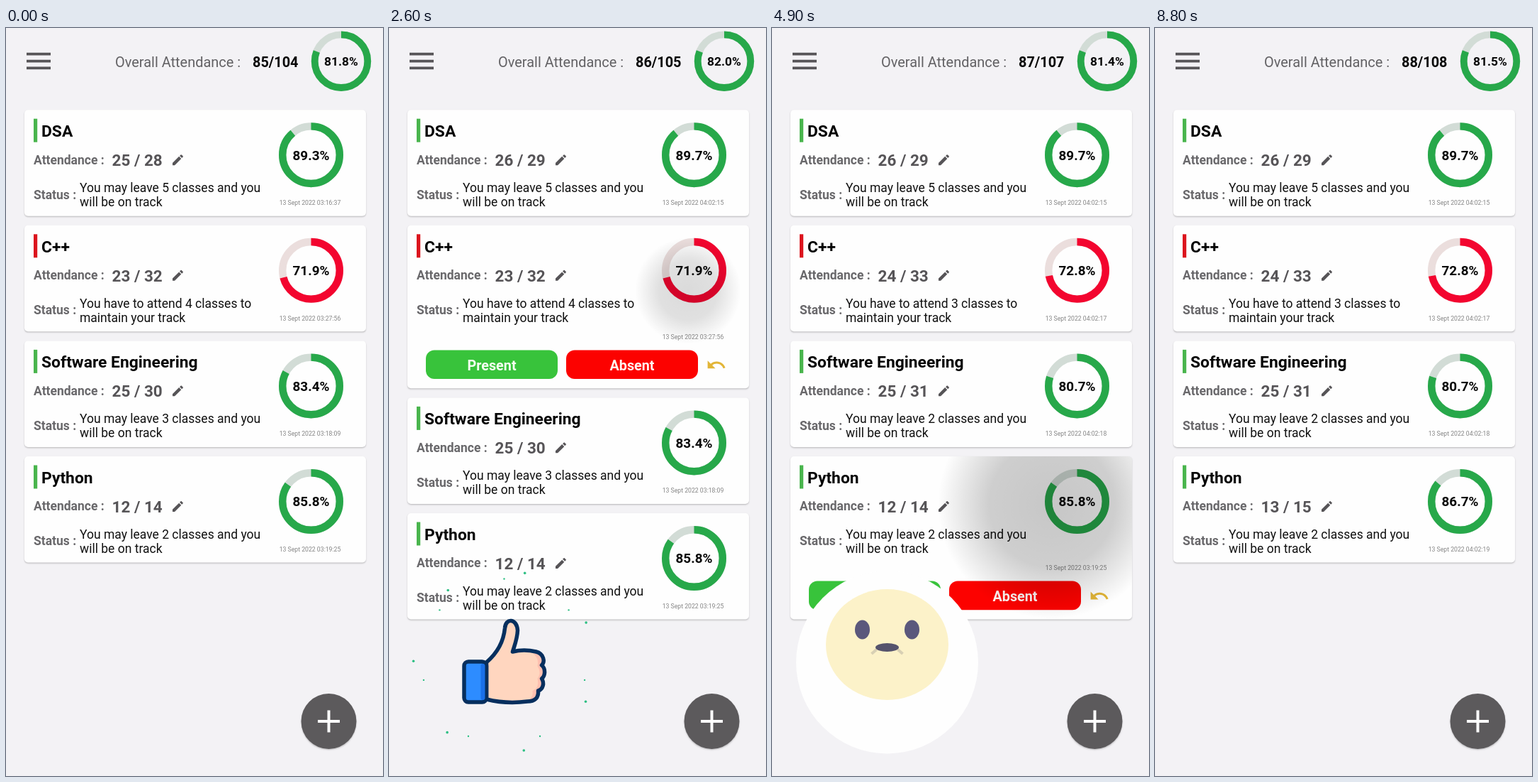
Recreate the animation shown at these times as an HTML page with a canvas. Size 532 by 1053 pixels, loop 8900 ms.

```html
<!DOCTYPE html>
<html lang="en">
<head>
<meta charset="utf-8">
<title>Attendance tracker</title>
<style>
html, body { margin: 0; width: 100%; height: 100%; overflow: hidden; background: #f3f2f5; }
canvas { display: block; }
</style>
</head>
<body>
<canvas id="stage" width="532" height="1053"></canvas>
<script>
const ctx = document.getElementById('stage').getContext('2d');
const LOOP = 8900, STEP = 100, TAU = Math.PI * 2, GOAL = 0.75;
const GREEN = '#27a84a', RED = '#f3052f', GREY = '#69686b', DARK = '#565457', NAVY = '#062f5e';

// opened: the card is tapped; marked: its button takes effect
const courses = [
  { name: 'DSA', attended: 25, total: 28, before: '03:16:37', after: '04:02:15', opened: 1100, marked: 1900, present: true, tap: [430, 70] },
  { name: 'C++', attended: 23, total: 32, before: '03:27:56', after: '04:02:17', opened: 2500, marked: 3300, present: true, tap: [422, 92] },
  { name: 'Software Engineering', attended: 25, total: 30, before: '03:18:09', after: '04:02:18', opened: 3400, marked: 4400, present: false, tap: [430, 80] },
  { name: 'Python', attended: 12, total: 14, before: '03:19:25', after: '04:02:19', opened: 4720, marked: 5900, present: true, tap: [395, 68] }
];

const pencil = new Path2D('M3 17.25V21h3.75L17.81 9.94l-3.75-3.75L3 17.25zM20.71 7.04a.996.996 0 0 0 0-1.41l-2.34-2.34a.996.996 0 0 0-1.41 0l-1.83 1.83 3.75 3.75 1.83-1.83z');
const undo = new Path2D('M12.5 8c-2.65 0-5.05.99-6.9 2.6L2 7v9h9l-3.62-3.62c1.39-1.16 3.16-1.88 5.12-1.88 3.54 0 6.55 2.31 7.6 5.5l2.37-.78C21.08 11.03 17.15 8 12.5 8z');
const hand = new Path2D('M-25 1C-11 -11 -1 -27 1 -47C2 -62 18 -61 19 -44C18.5 -32 15 -24 12 -14Q28 -18 45 -14C56 -11 58 0 53 5C59 10 58 20 53 24C57 30 55 39 48 41C49 51 43 56 33 56Q3 60 -25 53Z');
const knuckles = new Path2D('M38 -14C56 -12 58 0 53 5C59 10 58 20 53 24C57 30 55 39 48 41C49 51 43 56 32 56Q42 50 40 41Q50 37 47 24Q53 16 47 6Q50 -5 38 -14Z');

const clamp = v => Math.max(0, Math.min(1, v));
const progress = (t, from, to) => clamp((t - from) / (to - from));
const mix = (a, b, k) => a + (b - a) * k;
const easeOut = k => 1 - (1 - k) ** 3;

function text(str, x, y, size, color, weight = 400, align = 'left') {
  ctx.font = `${weight} ${size}px Roboto, sans-serif`;
  ctx.textAlign = align;
  ctx.fillStyle = color;
  ctx.fillText(str, x, y);
}

function box(x, y, w, h, r, color) {
  ctx.beginPath();
  ctx.roundRect(x, y, w, h, r);
  ctx.fillStyle = color;
  ctx.fill();
}

function oval(x, y, rx, ry, color) {
  ctx.beginPath();
  ctx.ellipse(x, y, rx, ry, 0, 0, TAU);
  ctx.fillStyle = color;
  ctx.fill();
}

function icon(path, x, y, scale, color) {
  ctx.save();
  ctx.translate(x, y);
  ctx.scale(scale, scale);
  ctx.fillStyle = color;
  ctx.fill(path);
  ctx.restore();
}

function withShadow(draw) {
  ctx.save();
  ctx.shadowColor = 'rgba(0,0,0,.22)';
  ctx.shadowBlur = 2;
  ctx.shadowOffsetY = 1.3;
  draw();
  ctx.restore();
}

// The label rounds up to a tenth, the ring down to a whole percent
function gauge(x, y, r, width, attended, total, size) {
  const ratio = attended / total, good = ratio >= GOAL;
  const label = (Math.ceil(ratio * 1000) / 10).toFixed(1) + '%';
  const arc = (color, part) => {
    ctx.beginPath();
    ctx.arc(x, y, r, -TAU / 4, TAU * (part - 0.25));
    ctx.strokeStyle = color;
    ctx.lineWidth = width;
    ctx.stroke();
  };
  arc(good ? '#d2dcd6' : '#ebdedd', 1);
  arc(good ? GREEN : RED, Math.floor(ratio * 100) / 100);
  text(label, x, y + size * 0.36, size, '#080808', 700, 'center');
}

// Touch ripple confined to a rounded rectangle
function ripple(age, x, y, [left, top, w, h, r]) {
  if (age <= 0 || age > 650) return;
  const alpha = mix(0.04, 0.24, progress(age, 0, 200)) * (1 - progress(age, 420, 650));
  const glow = ctx.createRadialGradient(x, y, 0, x, y, 75 * (age / 100) ** 1.3);
  glow.addColorStop(0, `rgba(0,0,0,${alpha})`);
  glow.addColorStop(0.55, `rgba(0,0,0,${alpha * 0.85})`);
  glow.addColorStop(1, 'rgba(0,0,0,0)');
  box(left, top, w, h, r, glow);
}

function tally(course, t) {
  const done = t >= course.marked;
  return { done, attended: course.attended + (done && course.present), total: course.total + done };
}

function advice(attended, total) {
  const spare = Math.floor(attended / GOAL - total);
  if (spare >= 0) return [`You may leave ${spare} classes and you`, 'will be on track'];
  const needed = Math.ceil((GOAL * total - attended) / (1 - GOAL));
  return [`You have to attend ${needed} classes to`, 'maintain your track'];
}

// Draws one card and returns its height
function card(course, y, t) {
  const { done, attended, total } = tally(course, t);
  const open = t >= course.opened && !done;
  const height = open ? 229.5 : 149.5;
  const frame = [26, y, 482, height, 5];
  withShadow(() => box(...frame, '#fefefe'));

  box(39, y + 12.5, 5.2, 33, 0, attended / total >= GOAL ? '#49b54d' : '#dc141d');
  text(course.name, 50, y + 37.8, 22.85, '#050505', 700);
  text('Attendance :', 39, y + 76.3, 17.5, GREY, 700);
  text(`${attended} / ${total}`, 149.5, y + 78.8, 22.5, DARK, 700);
  icon(pencil, 232.5, y + 60.5, 0.83, DARK);
  text('Status :', 39, y + 125.3, 17.5, GREY, 700);
  advice(attended, total).forEach((line, i) => text(line, 104, y + 115.8 + i * 20, 17.5, '#111'));
  gauge(430.5, y + 63.5, 40.3, 10.4, attended, total, 18.9);
  text('13 Sept 2022 ' + (done ? course.after : course.before),
    429, y + (open ? 160 : 134), 8.7, '#858585', 400, 'center');

  if (open) {
    const present = [52, y + 175.6, 186, 40.6, 12], absent = [250, y + 175.6, 186, 40.6, 12];
    box(...present, '#38c33b');
    box(...absent, '#fc0200');
    text('Present', 145, y + 203.7, 19.8, '#f6fff2', 700, 'center');
    text('Absent', 343, y + 203.7, 19.8, '#fff5f2', 700, 'center');
    icon(undo, 447.2, y + 182, 1.22, '#e2b537');
    ripple(t - course.marked + 160, course.present ? 165 : 350, y + 197, course.present ? present : absent);
  }
  ripple(t - course.opened, course.tap[0], y + course.tap[1], frame);
  return height;
}

function header(t) {
  let attended = 0, total = 0;
  for (const course of courses) {
    const now = tally(course, t);
    attended += now.attended;
    total += now.total;
  }
  for (let i = 0; i < 3; i++) box(29, 34.8 + i * 9.9, 34, 3.7, 0, DARK);
  text('Overall Attendance :', 154, 54.5, 19.95, '#626164');
  text(`${attended}/${total}`, 348, 54.5, 19.9, '#080808', 700);
  gauge(473, 46.7, 37.3, 9.8, attended, total, 17.4);
}

function addButton() {
  withShadow(() => oval(455.5, 976, 39, 39, '#5c5a5c'));
  box(440, 974, 31, 4, 0, '#fff');
  box(453.5, 960.5, 4, 31, 0, '#fff');
}

function thumbsUp(age) {
  if (age > 1000) return;
  ctx.save();
  ctx.translate(162.5, 892);
  ctx.globalAlpha = 1 - progress(age, 850, 1000);

  const burst = progress(age, 250, 500);
  if (burst > 0 && age < 600) {
    ctx.beginPath();
    ctx.arc(0, 0, 105.7 * easeOut(burst), 0, TAU);
    ctx.strokeStyle = '#2dbf7f';
    ctx.lineWidth = mix(7, 2.2, burst);
    ctx.stroke();
  }
  if (age >= 400) {
    const drift = progress(age, 500, 700), shrink = 1 - progress(age, 700, 850);
    const dot = (angle, distance, radius) =>
      oval(Math.cos(angle) * distance, Math.sin(angle) * distance, radius * shrink, radius * shrink, '#2dbf83');
    for (let i = 0; i < 7; i++) {
      const angle = -TAU / 4 + i * TAU / 7;
      dot(angle, mix(114, 116.5, drift), mix(2.5, 1.2, drift));
      dot(angle + 0.23, mix(119, 128, drift), mix(4, 1.8, drift));
    }
  }

  const size = age < 500 ? 1.19 * easeOut(progress(age, 0, 400)) : mix(1.19, 1, progress(age, 500, 700));
  ctx.scale(size, size);
  ctx.lineWidth = 5.5;
  ctx.lineJoin = 'round';
  ctx.strokeStyle = NAVY;
  ctx.fillStyle = '#ffd6bf';
  ctx.fill(hand);
  ctx.fillStyle = '#ffc0b0';
  ctx.fill(knuckles);
  ctx.stroke(hand);
  box(-56.5, 0, 31.5, 57, 6, '#2d8cff');
  ctx.stroke();
  box(-33, 3, 6, 51, 3, '#1a70e8');
  ctx.restore();
}

function sadFace(age) {
  if (age > 1400) return;
  ctx.save();
  ctx.translate(162.5, 893);
  ctx.globalAlpha = 1 - progress(age, 1200, 1400);
  const radius = 128.5 * easeOut(progress(age, 0, 300));
  oval(0, 0, radius, radius, '#fefefe');

  const size = easeOut(progress(age, 100, 450));
  ctx.translate(0, -25 * size);
  ctx.scale(size, size);
  oval(0, 0, 86.5, 78, '#fcf2c9');
  for (const side of [-1, 1]) {
    oval(side * 35, -21, 10.5, 13.5, '#5b587c');
    ctx.beginPath();
    ctx.moveTo(side * 15, 7);
    ctx.lineTo(side * 22, 13);
    ctx.strokeStyle = '#d8d0b4';
    ctx.lineWidth = 4;
    ctx.stroke();
  }
  oval(0, 4, 16.5, 6, '#55536c');
  ctx.restore();
}

function render(t) {
  ctx.fillStyle = '#f3f2f5';
  ctx.fillRect(0, 0, 532, 1053);
  header(t);
  let y = 115.2;
  for (const course of courses) y += card(course, y, t) + 13.1;
  addButton();
  for (const course of courses) {
    const age = t - course.marked;
    if (age > 0) (course.present ? thumbsUp : sadFace)(age);
  }
}

function tick() {
  const t = performance.now() % LOOP;
  render(Math.floor(t / STEP) * STEP);
  requestAnimationFrame(tick);
}
tick();
</script>
</body>
</html>
```
